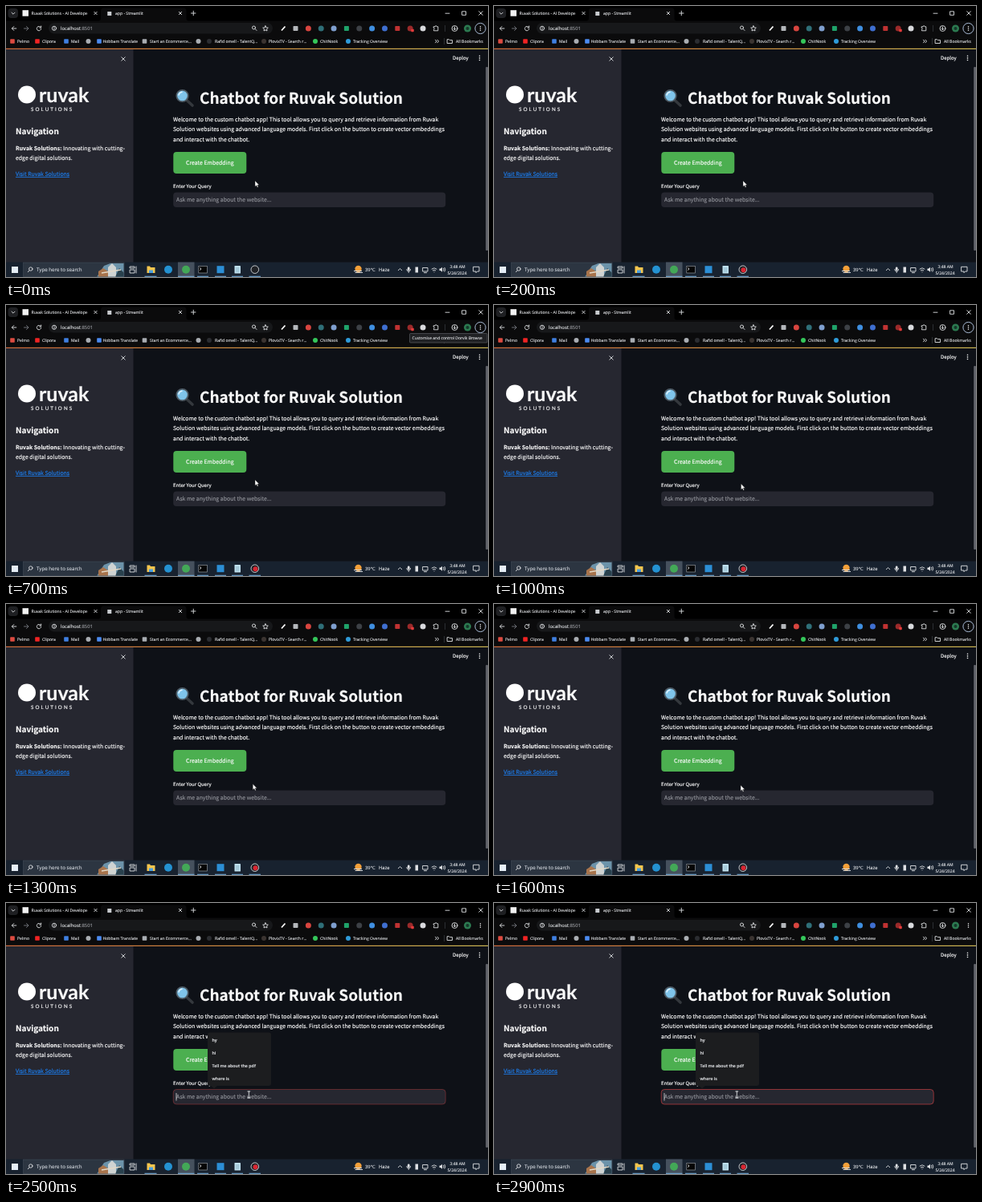
These frames come from a looping animation (600x338 px, 3 s). An HTML page:

```html
<!DOCTYPE html>
<html lang="en">
<head>
<meta charset="utf-8">
<title>Chatbot screen</title>
<style>
html, body { margin: 0; width: 100%; height: 100%; overflow: hidden; background: #0e1117; }
svg { display: block; width: 100vw; height: 100vh; }
text, tspan { fill: currentColor; stroke: currentColor; stroke-width: .12; text-rendering: geometricPrecision; white-space: pre; }
.ui { font: 5.1px "Open Sans", "Noto Sans", sans-serif; color: #e4e6e9; }
.app { font: 6.91px "Noto Sans CJK JP", "Noto Sans CJK SC", "Noto Sans CJK", "Open Sans", sans-serif; color: #fafafa; }
.app text { stroke-width: .17; }
.small { font-size: 6.05px; }
.weather { font-size: 5.8px; }
.line { fill: none; stroke: #dfe1e4; stroke-width: .9; stroke-linecap: round; stroke-linejoin: round; }
.dim { stroke: #777a80; }
</style>
</head>
<body>
<svg viewBox="0 0 600 338" preserveAspectRatio="none">
  <defs>
    <linearGradient id="deco"><stop stop-color="#cf6a3c"/><stop offset=".5" stop-color="#d08f42"/><stop offset="1" stop-color="#cdb653"/></linearGradient>
    <linearGradient id="fade"><stop stop-color="#000" stop-opacity="0"/><stop offset="1" stop-color="#000"/></linearGradient>
    <clipPath id="art"><rect x="113" y="320.5" width="33.5" height="17"/></clipPath>
  </defs>

  <!-- browser -->
  <g class="ui">
    <rect width="600" height="53" fill="#000"/>
    <path d="M0 18.5H115Q118 18.5 118 15.5V6Q118 2.5 121.5 2.5H221Q224.500 2.5 224.500 6V15.5Q224.500 18.5 227.500 18.5H600V53H0Z" fill="#0b0b0c"/>
    <rect x="2.5" y="3" width="12.5" height="12" rx="4" fill="#1e1f22"/>
    <path class="line" d="M7 8.200 9 10.200 11 8.200"/>
    <rect x="20.5" y="5.200" width="7.5" height="7.5" fill="#f2f2f2"/>
    <text x="31.5" y="10.900">Ruvak Solutions - AI Develope</text>
    <rect x="99" y="4" width="7" height="11" fill="url(#fade)"/>
    <rect x="126.300" y="7" width="5" height="5" fill="#c9ccd0"/>
    <text x="136" y="10.900">app - Streamlit</text>
    <path class="line" d="M109.800 7.300 113.200 10.700M113.200 7.300 109.800 10.700M215.300 7.300 218.700 10.700M218.700 7.300 215.300 10.700M230.500 9H236M233.250 6.250V11.750"/>
    <path class="line" d="M547 9.200H552M568 6.800H572.500V11.300H568ZM588.700 6.700 593.300 11.300M593.300 6.700 588.700 11.300"/>

    <rect x="53" y="21" width="279" height="13.5" rx="6.700" fill="#17181a"/>
    <path class="line" d="M12.800 28H7.500M9.800 25.500 7.300 28 9.800 30.500"/>
    <path class="line dim" d="M22.500 28H27.800M25.500 25.500 28 28 25.500 30.500"/>
    <path class="line" d="M43.200 26.500A2.700 2.700 0 1 0 43.700 28.500M43.700 25V27H41.700"/>
    <circle class="line" cx="60" cy="27.800" r="2.600"/>
    <path class="line" d="M60 27.700V29.100M60 26.400V26.500"/>
    <text x="68" y="30" style="font-size:5.95px">localhost<tspan style="color:#9a9da2">:8501</tspan></text>
    <g class="line"><circle cx="308.500" cy="27" r="2"/><path d="M310 28.500 312 30.500"/></g>
    <path class="line" d="M323 24.800 324 26.900 326.300 27.200 324.600 28.800 325 31 323 29.900 321 31 321.400 28.800 319.700 27.200 322 26.900Z"/>
    <g id="exts"></g>
    <path d="M343 30.500 347.500 25.500" stroke="#fff" stroke-width="1.8"/>
    <path class="line" d="M532.500 25.800H534.100A1.100 1.100 0 0 1 536.300 25.800H537.800V30.800H532.500V29.300A1.100 1.100 0 0 0 532.500 27.200Z"/>
    <path d="M546.500 24V32M545.500 40V48" stroke="#3c3f44" stroke-width=".7"/>
    <circle class="line" cx="558.500" cy="28" r="3.500"/>
    <path class="line" d="M558.500 26V29.500M557 28.300 558.500 29.800 560 28.300"/>
    <circle cx="574.500" cy="28" r="4.500" fill="#2c7a50"/>
    <circle cx="574.500" cy="28" r="2" fill="#15382a"/>
    <g fill="#eee"><circle cx="590.500" cy="25.700" r=".75"/><circle cx="590.500" cy="28" r=".75"/><circle cx="590.500" cy="30.300" r=".75"/></g>
    <circle id="ring" cx="590.500" cy="28" r="6.600" fill="none" stroke="#b9cdea" stroke-width=".9"/>

    <g id="marks"></g>
    <path class="line" d="M534.500 42.200 536 44 534.500 45.800M537 42.200 538.500 44 537 45.800"/>
    <path class="line" d="M549.500 41.700H551.500L552.300 42.600H555.500V46.500H549.500Z"/>
  </g>

  <!-- page -->
  <rect y="53" width="600" height="267" fill="#0e1117"/>
  <rect y="53" width="158.500" height="267" fill="#262730"/>
  <rect y="52.800" width="600" height="1.200" fill="url(#deco)"/>
  <g class="app">
    <path class="line" d="M143.800 63.800 148.200 68.200M148.200 63.800 143.800 68.200"/>
    <circle cx="26" cy="110.500" r="11" fill="#fff"/>
    <text x="41" y="119.500" style="font:700 25px Lato,sans-serif">ruvak</text>
    <text x="31" y="130.800" style="font:6.2px Lato,sans-serif;letter-spacing:2.1px">SOLUTIONS</text>
    <text x="12" y="160.300" style="font-size:10.05px;font-weight:700">Navigation</text>
    <text x="12" y="179.700"><tspan font-weight="700">Ruvak Solutions:</tspan> Innovating with cutting-</text>
    <text x="12" y="192.100">edge digital solutions.</text>
    <text x="12" y="212" style="color:#1c7ff0;text-decoration:underline">Visit Ruvak Solutions</text>

    <text x="556" y="67" class="small">Deploy</text>
    <g fill="#fafafa"><circle cx="589.500" cy="62.300" r=".8"/><circle cx="589.500" cy="64.900" r=".8"/><circle cx="589.500" cy="67.500" r=".8"/></g>
    <rect x="597.2" y="76" width="2.8" height="229" rx="1" fill="#62646b"/>

    <path d="M225.500 118 232 124" stroke="#34383d" stroke-width="3.600" stroke-linecap="round"/>
    <circle cx="219.500" cy="112" r="7.200" fill="#7fc4ea" stroke="#4d5a64" stroke-width="1.800"/>
    <path d="M215 111A5 5 0 0 1 219 107.300" fill="none" stroke="#dff3ff" stroke-width="1.500" stroke-linecap="round"/>
    <text x="241" y="122.400" style="font-size:19px;font-weight:700">Chatbot for Ruvak Solution</text>
    <text x="208" y="143.800">Welcome to the custom chatbot app! This tool allows you to query and retrieve information from Ruvak</text>
    <text x="208" y="156.300">Solution websites using advanced language models. First click on the button to create vector embeddings</text>
    <text x="208" y="168.700">and interact with the chatbot.</text>
    <rect x="208.300" y="182" width="91" height="27" rx="4" fill="#4caf50"/>
    <text x="253.800" y="198" text-anchor="middle">Create Embedding</text>
    <text x="208" y="226.500" class="small">Enter Your Query</text>
    <rect id="field" x="208.200" y="232.500" width="339" height="18.500" rx="4" fill="#262730" stroke="#ff4b4b" stroke-width=".8"/>
    <text x="212" y="244.300" style="color:#8d8f96">Ask me anything about the website...</text>
  </g>

  <!-- taskbar -->
  <g class="ui">
    <rect y="319.500" width="600" height="18.500" fill="#18222f"/>
    <rect x="7" y="325" width="8" height="8" fill="#e4edf6"/>
    <rect x="21.500" y="320" width="125.500" height="17.700" fill="#2c3541" stroke="#47515e" stroke-width=".5"/>
    <g class="line"><circle cx="30.800" cy="328" r="2.200"/><path d="M29.200 329.700 27.300 331.700"/></g>
    <text x="38" y="331.200" style="font-size:6.2px;color:#d3d8de">Type here to search</text>
    <g clip-path="url(#art)">
      <path d="M113 338 122 324 130 321H147V338Z" fill="#6c93aa"/>
      <path d="M115 338V331L121 327 127 331V338Z" fill="#a8744c"/>
      <path d="M127 338V326L132 321 137 326V338Z" fill="#cfd3d2"/>
      <path d="M136 338 141 327 147 333V338Z" fill="#29414d"/>
      <path d="M119 333 143 329" stroke="#e2d8c6" stroke-width="1.5"/>
    </g>
    <path class="line" d="M154.500 325H160V327H154.500ZM154.500 329H160V333H154.500ZM162 325V333"/>
    <rect x="214" y="319.500" width="20.500" height="18.500" fill="#46515e"/>
    <path d="M175.500 324.500H179L180 326H185.500V333H175.500Z" fill="#f4c64e"/>
    <rect x="178" y="329.500" width="5" height="3.500" fill="#4a9fe0"/>
    <circle cx="202" cy="328.700" r="5" fill="#2492d2"/>
    <circle cx="224" cy="328.700" r="5" fill="#43a857"/>
    <rect x="239.800" y="324.300" width="10.500" height="8.700" fill="#050505" stroke="#a5aab0" stroke-width=".6"/>
    <path d="M241.500 326.700 243 328 241.500 329.300" class="line"/>
    <rect x="262.500" y="324.200" width="9" height="9" fill="#2c8fd6"/>
    <rect x="284.500" y="324" width="7.500" height="9.500" rx=".6" fill="#bfe0ee"/>
    <path d="M286 327H290.500M286 329H290.500M286 331H290.500" stroke="#6a95ad" stroke-width=".6"/>
    <circle cx="309.800" cy="328.700" r="4.800" fill="#202226" stroke="#d5d8dc" stroke-width=".9"/>
    <circle id="rec" cx="310.500" cy="329.300" r="3" fill="#d92632"/>
    <path d="M172.500 337.300H187.500M214 337.300H234.500M238 337.300H252M260 337.300H274M281 337.300H295M302.500 337.300H317" stroke="#79b4e4" stroke-width="1"/>

    <circle cx="438.500" cy="328" r="4.200" fill="#f2a03a"/>
    <path d="M433 330.500H443M434.500 332.500H444" stroke="#d8dde2" stroke-width="1"/>
    <text x="447" y="331" class="weather">39°C</text>
    <text x="464" y="331" class="weather">Haze</text>
    <path class="line" d="M488.300 329.700 490.500 327.500 492.700 329.700"/>
    <rect x="499.800" y="325.500" width="2.800" height="4.500" rx="1.400" fill="#dfe1e4"/>
    <path class="line" d="M498.800 328.500A2.400 2.400 0 0 0 503.600 328.500M501.200 331V332.500"/>
    <path d="M509.500 325.500H513V332.500H509.500Z" fill="#dfe1e4"/>
    <path class="line" d="M519 326.500H525V331H519ZM520.500 332.700H523.500"/>
    <path class="line" d="M530 328A4.500 4.500 0 0 1 536 328M531.300 329.800A2.700 2.700 0 0 1 534.700 329.800M533 331.700V331.800"/>
    <path d="M539.500 327.500H541L543 325.700V331.700L541 330H539.500Z" fill="#dfe1e4"/>
    <path class="line" d="M544.500 327.300Q545.500 328.700 544.500 330.200M546 326.300Q547.700 328.700 546 331.200"/>
    <g text-anchor="middle"><text x="562" y="326.800">3:48 AM</text><text x="561.500" y="334.700">5/24/2024</text></g>
    <path class="line" d="M582 325.300H589V331H586.500L585 332.700V331H582Z"/>
  </g>

  <!-- overlays -->
  <g id="tip" class="ui">
    <rect x="502.500" y="35.500" width="96.500" height="11.500" rx="1" fill="#202124" stroke="#64676c" stroke-width=".6"/>
    <text x="505.500" y="43" style="font-size:5px">Customise and control Dorvik Browse</text>
  </g>
  <g id="popup" class="ui" style="font-size:5.3px;font-weight:600">
    <path d="M254.500 227.500H263.500L259 231.500Z" fill="#1c1d1f"/>
    <rect x="251" y="161.500" width="79" height="66.500" rx="3" fill="#1c1d1f"/>
    <path d="M212 237V246.500" stroke="#fafafa" stroke-width=".7"/>
  </g>
  <path id="arrow" d="M0 0V7.200L1.700 5.700 2.900 8.300 4 7.800 2.900 5.300H5.100Z" fill="#fff" stroke="#222" stroke-width=".4"/>
  <path id="beam" class="line" d="M-1.500 -4H1.500M0 -4V4M-1.500 4H1.500"/>
</svg>
<script>
const $ = id => document.getElementById(id);
const add = (parent, tag, attrs, label) => {
  const el = document.createElementNS("http://www.w3.org/2000/svg", tag);
  for (const k in attrs) el.setAttribute(k, attrs[k]);
  if (label) el.textContent = label;
  parent.append(el);
};
const square = (g, x, y, size, fill) =>
  add(g, "rect", { x: x - size / 2, y: y - size / 2, width: size, height: size, rx: .8, fill });
const dot = (g, cx, cy, r, fill) => add(g, "circle", { cx, cy, r, fill });

// icon x, label x, colour, round icon, label
const bookmarks = [
  [8, 14, "#dc4b40", 0, "Pelmo"],
  [39, 45, "#f02323", 0, "Clipora"],
  [75, 81, "#3f7fe0", 0, "Mail"],
  [102.5, 0, "#a9adb2", 1, ""],
  [116, 120.5, "#4c8bf0", 0, "Hobbam Translate"],
  [172.5, 179, "#a9adb2", 0, "Start an Ecommerce..."],
  [239.5, 0, "#a9adb2", 1, ""],
  [253, 260, "#2b2d31", 1, "Rafid omell - TalentQ..."],
  [321, 327, "#3b3431", 1, "PlovixTV - Search r..."],
  [385, 391, "#35c65a", 1, "ChitNook"],
  [426, 432, "#2f9bd8", 1, "Tracking Overview"],
  [0, 560, "", 0, "All Bookmarks"]
];
for (const [x, tx, fill, round, label] of bookmarks) {
  if (x) round ? dot($("marks"), x, 44, 3, fill) : square($("marks"), x, 44, 5.6, fill);
  if (label) add($("marks"), "text", { x: tx, y: 45.9 }, label);
}

const extColors = ["#b4b7bb", "#d8453f", "#2f6f78", "#7f9fcf", "#1fa36a", "#3d4146",
  "#3f8fe0", "#3f6fd0", "#c03232", "#9a2a2a", "#d9dadd"];
extColors.forEach((c, i) => {
  const x = 360.5 + i * 15.85;
  i % 4 ? dot($("exts"), x, 28, 3.5, c) : square($("exts"), x, 28, 6, c);
});
square($("exts"), 506, 30.5, 3.5, "#e33b3b");

["hy", "hi", "Tell me about the pdf", "where is"].forEach((s, i) =>
  add($("popup"), "text", { x: 256.5, y: 173 + i * 15.9 }, s));

// time, x, y of the pointer
const path = [[0, 310, 218], [700, 310, 218], [1000, 307.5, 223], [1600, 307, 226], [2200, 302.3, 239], [3000, 302.3, 239]];
function pointer(t) {
  const i = path.findIndex(p => p[0] > t);
  const [a, b] = [path[i - 1], path[i]];
  const k = (t - a[0]) / (b[0] - a[0]);
  return [a[1] + (b[1] - a[1]) * k, a[2] + (b[2] - a[2]) * k];
}
const show = (id, on) => $(id).setAttribute("visibility", on ? "visible" : "hidden");

function draw() {
  const t = Math.floor(performance.now() % 3000 / 100) * 100;
  const [x, y] = pointer(t);
  const focused = t >= 2400;
  const overField = y > 231.5;
  for (const id of ["arrow", "beam"]) $(id).setAttribute("transform", `translate(${x} ${y})`);
  show("arrow", !overField);
  show("beam", overField);
  show("rec", t >= 200);
  show("tip", t >= 600 && t < 900);
  show("ring", !focused);
  show("popup", focused);
  const glow = Math.min(1, Math.max(0, (t - 2350) / 250));
  $("field").setAttribute("stroke-opacity", glow * .65);
  requestAnimationFrame(draw);
}
draw();
</script>
</body>
</html>
```
